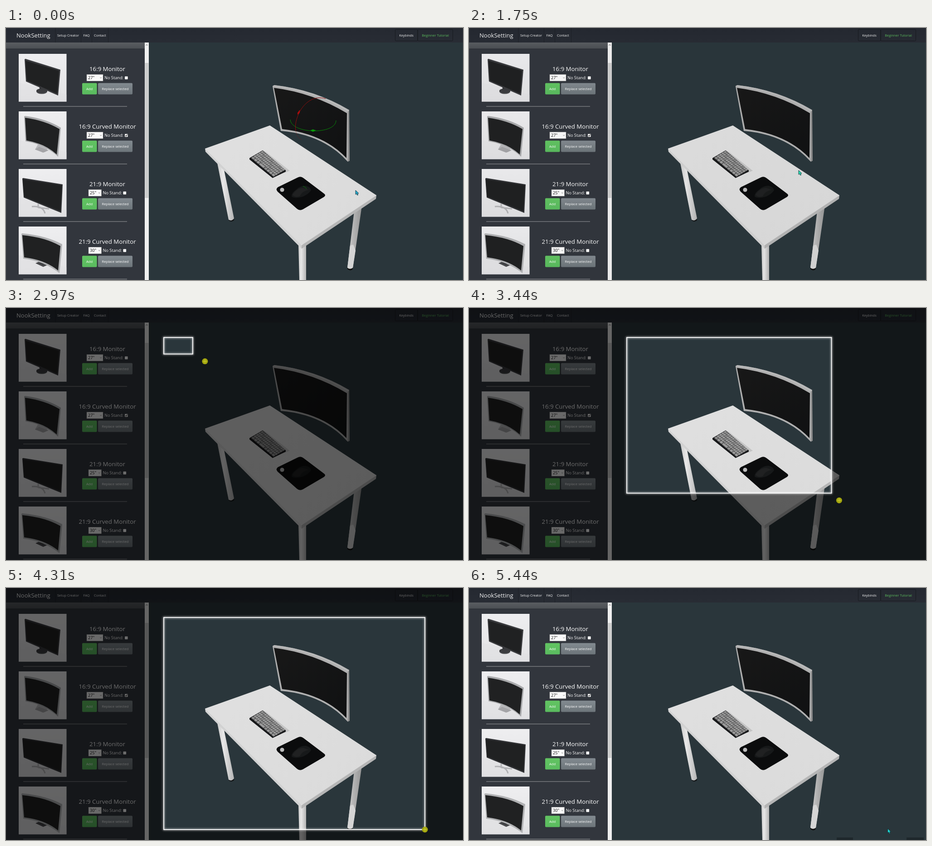
An HTML page that plays this animation: 1008x556 px, repeating every 5.56 s.

```html
<!DOCTYPE html>
<html lang="en">
<head>
<meta charset="utf-8">
<title>Desk planner</title>
<style>
html, body { margin: 0; width: 100%; height: 100%; overflow: hidden; background: #2a363b; }
svg { display: block; width: 100vw; height: 100vh; font-family: "Open Sans", "Noto Sans", sans-serif; }
</style>
</head>
<body>
<svg id="stage" viewBox="0 0 1008 556" preserveAspectRatio="none">
  <defs>
    <linearGradient id="nav" x2="0" y2="1"><stop stop-color="#252931"/><stop offset="1" stop-color="#282c34"/></linearGradient>
    <linearGradient id="bar" x2="0" y2="1"><stop stop-color="#5a5d61"/><stop offset="1" stop-color="#4b4f54"/></linearGradient>
    <linearGradient id="grey" x2="0" y2="1"><stop stop-color="#828a90"/><stop offset="1" stop-color="#6d757a"/></linearGradient>
    <linearGradient id="green" x2="0" y2="1"><stop stop-color="#62c462"/><stop offset="1" stop-color="#5abb5f"/></linearGradient>
    <linearGradient id="photo" x2="0" y2="1"><stop stop-color="#eeeef0"/><stop offset="1" stop-color="#e2e2e4"/></linearGradient>
    <linearGradient id="top" x2="1" y2="1"><stop stop-color="#e0e0e0"/><stop offset="1" stop-color="#dadada"/></linearGradient>
    <linearGradient id="leg"><stop stop-color="#c9c9c9"/><stop offset=".35" stop-color="#e8e8e8"/><stop offset="1" stop-color="#b4b4b4"/></linearGradient>
    <linearGradient id="shade"><stop stop-color="#d4d4d4"/><stop offset=".4" stop-color="#b5b5b5"/><stop offset="1" stop-color="#959595"/></linearGradient>
    <linearGradient id="screen" x2="1" y2="1"><stop stop-color="#181818"/><stop offset="1" stop-color="#101112"/></linearGradient>
    <filter id="glow" x="-20%" y="-20%" width="140%" height="140%" filterUnits="objectBoundingBox"><feGaussianBlur stdDeviation="2"/></filter>
  </defs>

  <rect width="1008" height="556" fill="#2a363b"/>

  <!-- desk -->
  <g>
    <path d="M466 298L481 313 503 420Q498 427 491 423Z" fill="url(#leg)"/>
    <path d="M491 423Q497 428 503 421L503 424Q498 429 492 425Z" fill="#111"/>
    <path d="M768 404L785 392 765 529Q759 534 753 529Z" fill="url(#shade)"/>
    <path d="M759 480L766 478 771 491 765 529Q759 534 753 529Z" fill="#d5d5d5"/>
    <path d="M753 529Q759 534 765 529L764 533Q759 537 753 532Z" fill="#111"/>
    <path d="M645 478H662V556H647Z" fill="url(#leg)"/>
    <path d="M439 266L652 479V487L440 273Z" fill="#d2d2d2"/>
    <path d="M652 479L817 369 816 377 652 487Z" fill="#b5b5b5"/>
    <path d="M439 266L582 215 817 369 652 479Z" fill="url(#top)"/>
    <path d="M439 266L652 479 817 369" fill="none" stroke="#ececec" stroke-width=".7"/>
  </g>

  <!-- floating monitor -->
  <g>
    <path d="M588 128L592 126Q681 136 757 181L758 293 754 295Z" fill="#8f8f8f"/>
    <path d="M588 128L592 126Q681 136 757 181L754 185Q678 139 588 129Z" fill="#b9b9b9"/>
    <path d="M588 129Q678 139 754 185V295Q700 235 606 227Z" fill="#b0b0b0"/>
    <path d="M591 132Q677 143 752 188L751 287Q700 233 609 223Z" fill="url(#screen)"/>
  </g>
  <g id="gizmo" fill="none">
    <path d="M627 202C629 234 727 236 728 204" stroke="#078a07"/>
    <path d="M671 226L677 223.500 684 226 677 229Z" fill="#0a980a"/>
    <path d="M705 156C681 148 660 163 648 184C640 200 637 214 639 226" stroke="#920d0d"/>
    <path d="M639 226Q641 240 652 247" stroke="#920d0d" opacity=".35"/>
    <path d="M648 180.500L648 187 643 191.500 643 187Z" fill="#a80d0d"/>
  </g>

  <!-- keyboard and mouse -->
  <path d="M566 270L574 274 626 315 612 320Z" fill="#c5c5c5"/>
  <path d="M537 287L566 270 617 314V317L588 331 537 290Z" fill="#17181a"/>
  <g id="keys"></g>
  <path d="M600 351L643 330Q650 326 656 331L701 365Q707 369 701 373L655 400Q648 404 642 399L599 361Q594 355 600 351Z" fill="#0b0c0d"/>
  <circle cx="609" cy="357" r="4.600" fill="#bdbdbd"/>
  <path d="M630 372Q629 364 641 356 649 348 661 348 671 350 673 358 668 366 655 372 637 377 630 372Z" fill="#17191a"/>
  <path d="M632 368Q642 352 656 353L668 357Q654 359 648 371 638 375 632 368Z" fill="#202122"/>
  <path id="led" d="M655 349Q661 351 663 355" fill="none" stroke="#087808"/>

  <!-- navigation -->
  <rect width="1008" height="32" fill="url(#nav)"/>
  <path d="M109 0V32M165.500 0V32M189.500 0V32M225.500 0V32" stroke="#1e2127"/>
  <g fill="none" stroke="#171a1f"><rect x="858.500" y="3" width="49.500" height="25.500" rx="2"/><rect x="908" y="3" width="77.500" height="25.500" rx="2"/></g>
  <g fill="#f4f4f4" font-size="7.450">
    <text x="23" y="21" font-size="13.050">NookSetting</text>
    <text x="113" y="19">Setup Creator</text>
    <text x="170.500" y="19">FAQ</text>
    <text x="194" y="19">Contact</text>
    <text x="883" y="19" text-anchor="middle">Keybinds</text>
    <text x="947" y="19" text-anchor="middle" fill="#5bbd5d">Beginner Tutorial</text>
  </g>

  <!-- sidebar -->
  <rect y="32" width="306" height="524" fill="#32363d"/>
  <rect y="32" width="306" height="14" fill="url(#bar)"/>
  <path d="M0 46H306" stroke="#292d33"/>
  <rect x="306" y="32" width="9" height="524" fill="#f0f0f0"/>
  <rect x="306.500" y="77" width="8" height="298" fill="#cdcdcd"/>
  <path d="M308.500 38.500L310.500 36.500 312.500 38.500" fill="none" stroke="#444"/>
  <g id="cards"></g>

  <!-- capture overlay -->
  <path id="dim" fill-rule="evenodd"/>
  <rect id="tint" fill="rgb(237,175,112)"/>
  <g id="frame" fill="none" stroke="#fff">
    <rect stroke-width="3" opacity=".7" filter="url(#glow)"/>
    <rect stroke-width="1.800"/>
  </g>
  <path id="toast" d="M811 550.500H847V556H811ZM965 550.500H1003V556H965Z" fill="#1e272b"/>
  <path id="arrow" d="M0 0V9.300L2.200 7.500 3.800 11 5.600 10.200 4.200 7 7 6.800Z" stroke="#0e2a33" stroke-width=".8" stroke-linejoin="round"/>
  <g id="cross">
    <circle r="6.500" fill="#a2a50e"/>
    <path d="M-4.500 0H4.500M0 -4.500V4.500" stroke="#d3d63a" stroke-width=".9"/>
  </g>
</svg>
<script>
const LOOP = 5560, DIM = 0.575;
const el = id => document.getElementById(id);
const clamp = v => Math.max(0, Math.min(1, v));
const span = (t, a, b) => clamp((t - a) / (b - a));
const mix = (a, b, p) => a + (b - a) * p;
const show = (node, on) => node.setAttribute("visibility", on ? "visible" : "hidden");

// Key caps: a grid laid over a skewed quad.
function drawKeys() {
  const a = [540, 286], across = [50, 42], down = [26, -15.5];
  const at = (u, v) => [0, 1].map(i => (a[i] + across[i] * u + down[i] * v).toFixed(1)).join(" ");
  const cap = (u0, u1, v, fill, lift) =>
    `<path transform="translate(0 ${lift})" d="M${at(u0, v)}L${at(u1, v)} ${at(u1, v + .17)} ${at(u0, v + .17)}Z" fill="${fill}"/>`;
  let out = "";
  for (let row = 4; row >= 0; row--) {
    const n = row ? 14 : 9, v = row / 5 + .02;
    for (let i = 0; i < n; i++) {
      const wide = !row && i === 3 ? 1 : 0;
      const u0 = (i + .07) / n, u1 = (i + .9 + wide) / n;
      if (!row && i === 4) continue;
      out += cap(u0, u1, v, "#595959", 1.2) + cap(u0, u1, v, (i + row) % 5 ? "#9b9b9b" : "#8c8c8c", 0);
    }
  }
  el("keys").innerHTML = out;
}

// Product pictures, relative to each card's corner at 28,57.
const flat = (frame, outer, inner, stand) =>
  `${stand}<path d="${outer}" fill="${frame}"/><path d="${inner}" fill="#202122"/>`;
const pictures = [
  flat("#393a3d", "M13 12L15 11 92 35 87 92 16 61Z", "M15 15L89 37 85 88 18 59Z",
    `<path d="M45 69L58 74V84H47Z" fill="#303134"/><ellipse cx="51" cy="83" rx="12" ry="5.500" fill="#48494c"/><ellipse cx="51" cy="81.500" rx="12" ry="5" fill="#3b3c3f"/>`),
  flat("#a9aaac", "M12 11L14 10Q61 16 93 36L87 100Q58 73 15 66Z", "M14 14Q58 20 90 39L84 95Q58 71 17 64Z",
    `<path d="M43 72L64 82 58 90 36 84Z" fill="#b8b8bb"/><path d="M36 84L45 78 66 86 54 91Z" fill="#a4a4a7"/>`),
  flat("#313235", "M8 21L10 20 97 34 94 97 11 63Z", "M9 23L95 36 92 93 12 61Z",
    `<path d="M43 77V86M29 83Q54 81 58 98M43 85L67 88" fill="none" stroke="#b2b2b5" stroke-width="3"/>`),
  flat("#b0b1b3", "M6 16L8 15Q60 20 96 39L90 103Q56 76 10 71Z", "M8 19Q59 24 92 43L87 97Q57 73 12 68Z",
    `<path d="M37 81L48 76 66 84 54 89Z" fill="#47484b"/><path d="M45 73L57 78 54 84 46 81Z" fill="#333437"/>`)
];
const products = [
  ["16:9 Monitor", '27"', false, 178, 36],
  ["16:9 Curved Monitor", '27"', true, 178, 36],
  ["21:9 Monitor", '25"', false, 182, 28.5],
  ["21:9 Curved Monitor", '30"', false, 182, 28.5]
];

function card([name, size, checked, x, w], i) {
  const label = x + w + 3, box = label + 45;
  return `<g transform="translate(0 ${i * 127})" fill="#fff">
    <rect x="28" y="57" width="105.500" height="105.500" fill="url(#photo)"/>
    <path d="M28 120L133.500 147V162.500H28Z" fill="#dedee0" opacity=".45"/>
    <g transform="translate(28 57)">${pictures[i]}</g>
    <text x="223.500" y="94.500" font-size="13.200" text-anchor="middle">${name}</text>
    <rect x="${x}" y="102.500" width="${w}" height="14.500" fill="#fafafa" stroke="#8a8a8a" stroke-width=".5"/>
    <text x="${x + 3}" y="113.200" font-size="9.200" fill="#111">${size}</text>
    <path d="M${x + w - 6.5} 109l1.700 1.700 1.700 -1.700" fill="none" stroke="#555" stroke-width=".8"/>
    <text x="${label}" y="113.200" font-size="9.200">No Stand:</text>
    <rect x="${box}" y="106.700" width="6.600" height="6.600" rx=".8"/>
    ${checked ? `<path d="M${box + 1.2} 110l1.700 1.700 2.700 -3.500" fill="none" stroke="#222" stroke-width="1.100"/>` : ""}
    <rect x="168" y="121.500" width="32.500" height="25" rx="2" fill="url(#green)"/>
    <rect x="203" y="121.500" width="76" height="25" rx="2" fill="url(#grey)"/>
    <g font-size="7.600" text-anchor="middle"><text x="184" y="136.800">Add</text><text x="241" y="136.800">Replace selected</text></g>
    <path d="M38 173H267" stroke="#a6a8aa" stroke-width=".9"/>
  </g>`;
}

// Pointer stops: time, x, y, easing into the stop.
const smooth = p => p * p * (3 - 2 * p), into = p => p * p, out = p => 1 - (1 - p) ** 2;
const stops = [
  [0, 771, 358], [30, 771, 358], [290, 727, 314, smooth],
  [1880, 727, 314], [2290, 656, 133, into], [2850, 348, 65, out],
  [2880, 348, 65], [2940, 411, 101], [2970, 438, 117], [3190, 622, 254],
  [3410, 799, 408], [3440, 816, 424], [3540, 858, 466], [3680, 890, 498],
  [3840, 908, 516], [3990, 918, 526], [4280, 924, 533, out], [LOOP, 924, 533]
];
function pointer(t) {
  const k = Math.max(1, stops.findIndex(s => s[0] > t));
  const a = stops[k - 1], b = stops[k];
  const p = (b[3] || (v => v))(span(t, a[0], b[0]));
  return [mix(a[1], b[1], p), mix(a[2], b[2], p)];
}

function setBox(node, x, y, w, h) {
  Object.entries({ x, y, width: w, height: h }).forEach(([k, v]) => node.setAttribute(k, v));
}

function render(t) {
  const leave = span(t, 4500, 4950);
  const shade = DIM * smooth(span(t, 1710, 2080)) * (1 - leave * leave);
  const active = t >= 2905 && t < 4950;
  const [x, y] = pointer(t);
  // The selection trails the pointer by one display step.
  const [rx, ry] = pointer(t - 30);
  const w = Math.max(0, rx - 348), h = Math.max(0, ry - 65);

  show(el("gizmo"), t < 690);
  show(el("led"), t < 1750);
  el("dim").setAttribute("d", "M0 0H1008V556H0Z" + (active ? `M348 65h${w}v${h}h${-w}Z` : ""));
  el("dim").setAttribute("opacity", shade);

  show(el("tint"), active && leave > 0);
  setBox(el("tint"), 348, 65, w, h);
  el("tint").setAttribute("opacity", .26 * Math.sin(Math.PI * leave));

  show(el("frame"), active);
  for (const r of el("frame").children) setBox(r, 348, 65, w, h);
  el("frame").setAttribute("opacity", 1 - leave ** 3);

  const crossing = t >= 1900 && t < 4500;
  show(el("cross"), crossing);
  show(el("arrow"), !crossing);
  el("cross").setAttribute("transform", `translate(${x} ${y})`);
  const tip = t >= 4500 ? [923.5, 531] : [x, y];
  el("arrow").setAttribute("transform", `translate(${tip})`);
  el("arrow").setAttribute("fill", t < 1750 ? "#23a9cc" : t < 4500 ? "#25dfb4" : "#22d6d0");
  el("toast").setAttribute("opacity", span(t, 5080, 5440));
}

drawKeys();
el("cards").innerHTML = products.map(card).join("");
const start = performance.now();
function tick() {
  render((performance.now() - start) % LOOP);
  requestAnimationFrame(tick);
}
render(0);
requestAnimationFrame(tick);
</script>
</body>
</html>
```
